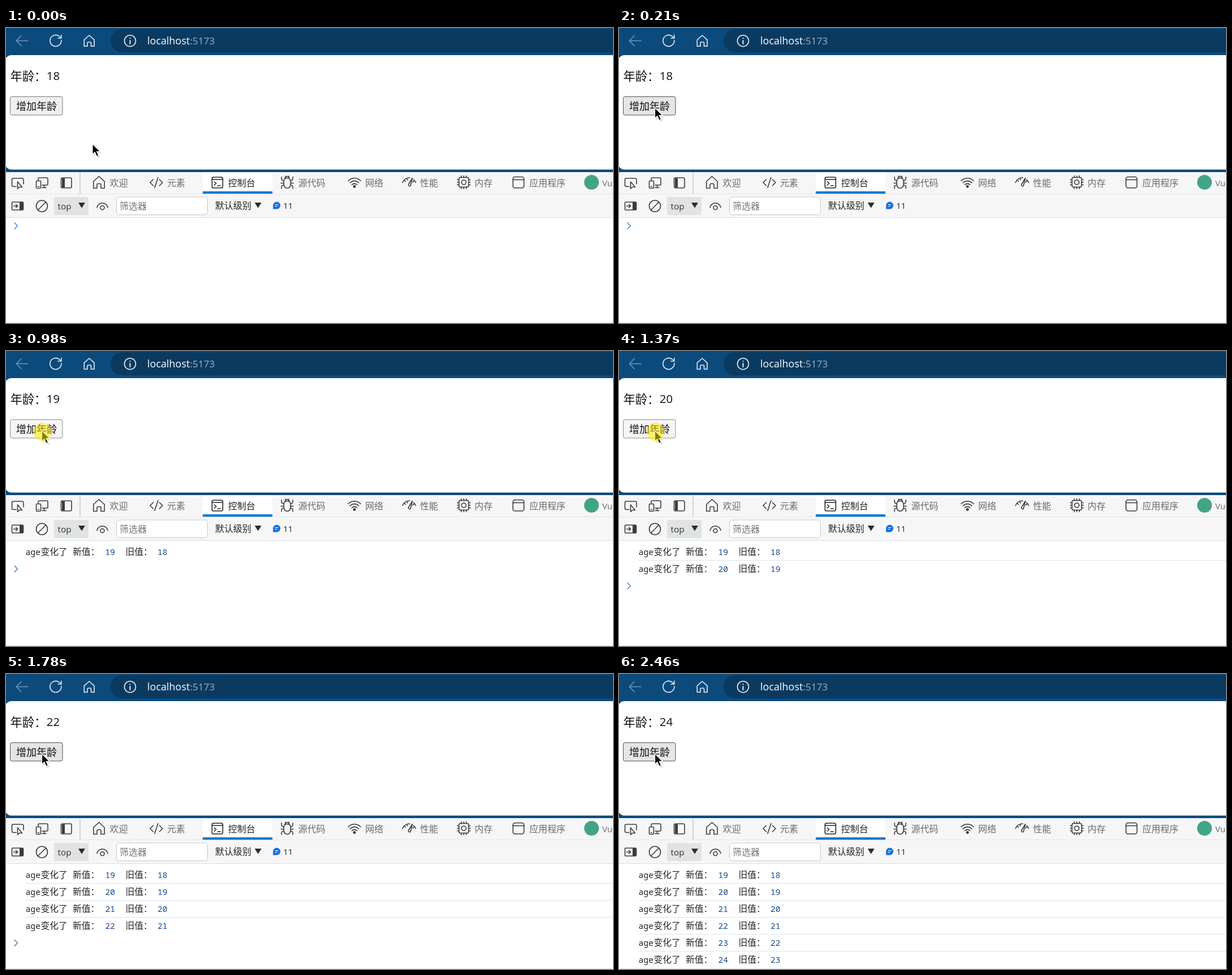
Animation of 1074x522 px, one loop 3020 ms. Source, as an HTML page:

```html
<!DOCTYPE html>
<html lang="zh">
<head>
<meta charset="utf-8">
<title>Age watcher</title>
<style>
  html, body { margin: 0; width: 100%; height: 100%; overflow: hidden; background: #fff; }
  svg { display: block; width: 100%; height: 100%; }
  text { font-family: "Open Sans", "Noto Sans CJK SC", "Noto Sans CJK", sans-serif; white-space: pre; }
  .line { fill: none; stroke-width: 1.6; stroke-linecap: round; stroke-linejoin: round; }
  .light { stroke: #e4eef6; }
  .dark { stroke: #3b3b3b; }
  .fill { fill: #3b3b3b; stroke: none; }
  .tabs { font-size: 16px; fill: #6b6b6b; }
  .log text { font-family: "Noto Sans Mono", "Noto Sans CJK SC", "Noto Sans CJK", monospace; font-size: 14.7px; fill: #222; }
  .log .cjk { font-family: "Noto Sans CJK SC", "Noto Sans CJK", sans-serif; font-size: 15.8px; }
  .log .num { fill: #174a8c; }
  #button { fill: #efefef; stroke: #767676; }
  #button.hover { fill: #e5e5e5; stroke: #4f4f4f; }
  #button.down { fill: #f5f5f5; stroke: #8d8d8d; }
</style>
</head>
<body>
<svg viewBox="0 0 1074 522" preserveAspectRatio="none">
  <rect width="1074" height="522" fill="#fff"/>

  <!-- browser bar -->
  <rect width="1074" height="255" fill="#0c4a7c"/>
  <rect x="185" y="2" width="920" height="41" rx="20.5" fill="#0a3a60"/>
  <g class="line light">
    <path d="M39 22.5H18.5M27 13.5l-8.7 9 8.7 9" stroke="#7299b8"/>
    <path d="M97.8 21.5A10 10 0 1 1 93.5 14.2L97.5 17.5M97.8 12.3V18H92"/>
    <path d="M138.3 20.8L147.2 13l8.9 7.8V32.3H150.5V26.5a1.5 1.5 0 0 0-1.5-1.5H145.5a1.5 1.5 0 0 0-1.5 1.5V32.3H138.3Z"/>
    <circle cx="219.5" cy="22.7" r="10"/>
    <path d="M219.5 22v6M219.5 18v.2" stroke-width="2"/>
  </g>
  <text x="250" y="29" font-size="18" fill="#fff">localhost</text>
  <text x="325.5" y="29" font-size="17.2" fill="#9db1c2">:5173</text>

  <!-- page -->
  <rect x="-1" y="48" width="1100" height="202.5" rx="10" fill="#fff"/>
  <text x="7.5" y="92.5" font-size="21.3" fill="#111">年龄：</text>
  <text id="age" x="71.8" y="92.3" font-size="20.3" fill="#111">18</text>
  <rect id="button" x="7.5" y="121.5" width="92.5" height="32.5" rx="3"/>
  <text x="18" y="144.7" font-size="18" fill="#111">增加年龄</text>

  <!-- developer tools -->
  <rect y="255" width="1074" height="81" fill="#f6f6f6"/>
  <path d="M0 293.5H1074" stroke="#e6e6e6"/>
  <path d="M0 335.5H1074" stroke="#d3e1f2"/>
  <path d="M131 256V293" stroke="#bdbdbd" stroke-width="1.3"/>
  <rect x="348" y="255" width="123" height="36" fill="#fff"/>
  <rect x="348" y="289" width="123.5" height="4.2" rx="1" fill="#0a78d4"/>
  <path d="M0 521.5H1074" stroke="#e4e7ea"/>

  <g class="line dark">
    <path d="M18 280.5H13a2.5 2.5 0 0 1-2.5-2.5V268.5a2.5 2.5 0 0 1 2.5-2.5H28.500a2.500 2.500 0 0 1 2.500 2.500V276"/>
    <path d="M20.500 272V284.500l3-3H28.500Z" fill="#f6f6f6"/>
    <path d="M57 269V267a2 2 0 0 1 2-2H72a2 2 0 0 1 2 2V276a2 2 0 0 1-2 2H64M64 282.500H71M67.500 278v4"/>
    <rect x="53.500" y="270.500" width="8" height="13" rx="1.500"/>
    <path d="M56.500 280.500h2"/>
    <rect x="97.500" y="265" width="18.500" height="18" rx="2.500"/>
    <path class="fill" d="M99 266h5v16h-5z"/>

    <path d="M154.800 271.500L164.500 262.500l9.700 9V283.500H168V277a1.500 1.500 0 0 0-1.500-1.500H162.500a1.500 1.500 0 0 0-1.500 1.500V283.500H154.800Z"/>
    <path d="M260.500 268l-5.500 5.500 5.500 5.500M271.500 268l5.500 5.500-5.500 5.500M269 264.500l-6 18"/>
    <g stroke="#222">
      <rect x="364.500" y="264" width="19" height="19" rx="2.500"/>
      <path d="M364.500 268H383.500M368.500 272l3.500 3-3.500 3M374.500 279h5"/>
    </g>
    <path d="M491.500 270.500a6 5 0 0 1 12 0V277a6 6.500 0 0 1-12 0ZM493.500 266.500a4 4 0 0 1 8 0M494.500 262l1 2M500.500 262l-1 2"/>
    <path d="M487.500 263.500V266.500q0 3 4 4M486.500 274.500h5M487.500 284V281q0-2.500 4-3M507.500 263.500V266.500q0 3-4 4M508.500 274.500h-5M507.500 284V281q0-2.500-4-3"/>
    <path d="M605.500 270.500a15 15 0 0 1 22 0M608.800 274a10.500 10.500 0 0 1 15.400 0M612 277.300a6.200 6.200 0 0 1 9 0"/>
    <circle cx="616.500" cy="280.500" r="1.700" fill="#3b3b3b"/>
    <path d="M701.500 273.500a14 14 0 0 1 13-8.500M721 268a14 14 0 0 1 4 5.500M704 269l3 2.500M709 266l1.500 3M722.500 270.500l-3 2"/>
    <path d="M719 265.500l-7 11.500a2.200 2.200 0 0 0 3.700 2Z"/>
    <rect x="801.500" y="264.500" width="17" height="17" rx="2.500"/>
    <circle cx="810" cy="273" r="4"/>
    <path d="M805.500 261.500v3M810 261.500v3M814.500 261.500v3M805.500 281.500v3M810 281.500v3M814.500 281.500v3M798.500 268.500h3M798.500 273h3M798.500 277.500h3M818.500 268.500h3M818.500 273h3M818.500 277.500h3"/>
    <rect x="897" y="263.500" width="19.500" height="19.500" rx="3.500"/>
    <path d="M897 268.500H916.500"/>
  </g>
  <circle cx="1036" cy="273" r="13" fill="#42a486"/>
  <g class="tabs">
    <text x="183.500" y="279.500">欢迎</text>
    <text x="285" y="279.500">元素</text>
    <text x="393" y="279.500" fill="#222">控制台</text>
    <text x="517" y="279.500">源代码</text>
    <text x="635.500" y="279.500">网络</text>
    <text x="732.500" y="279.500">性能</text>
    <text x="829" y="279.500">内存</text>
    <text x="926" y="279.500">应用程序</text>
    <text x="1055" y="279.500" font-size="15">Vue</text>
  </g>

  <!-- console toolbar -->
  <rect x="85" y="299" width="61" height="32" rx="2" fill="#e1e2e2"/>
  <rect x="195.500" y="299" width="161" height="31.500" rx="5" fill="#fff" stroke="#c9c9c9"/>
  <g class="line dark">
    <rect x="10.500" y="308" width="20" height="14" rx="1.500"/>
    <path class="fill" d="M24 308h7v14h-7z"/>
    <path d="M13.500 315H20.500M17.500 312l3.200 3-3.200 3"/>
    <circle cx="63.500" cy="315" r="10"/>
    <path d="M70.500 308L56.500 322"/>
    <path d="M161 317.500a9.700 9.700 0 0 1 19 0"/>
    <circle cx="170.500" cy="318" r="3.500"/>
  </g>
  <path d="M128 309h12l-6 9.500ZM440 309h12l-6 9.500Z" fill="#2b2b2b"/>
  <text x="91.500" y="320.500" font-size="15.300" fill="#333">top</text>
  <text x="201" y="320.800" font-size="16" fill="#777">筛选器</text>
  <text x="370" y="320" font-size="16" fill="#222">默认级别</text>
  <path d="M472.500 320.500V314a6.500 6.500 0 1 1 6.500 6.500Z" fill="#1a6fe0"/>
  <path d="M476 312.500h6M476 315.500h4" stroke="#fff" stroke-width="1.200"/>
  <text x="490.500" y="320" font-size="14.800" fill="#222">11</text>

  <!-- console output -->
  <g id="log" class="log"></g>
  <path id="prompt" class="line" d="M15 -5.500l5.500 5.500L15 5.500" stroke="#4a8fd6" stroke-width="1.500"/>

  <!-- pointer -->
  <g id="pointer">
    <path d="M2 3V22l4.500-4 3.300 7 4-1.700-3-6.500H16.500Z" fill="#000" opacity=".13"/>
    <path d="M0 0V18.800l4.300-4 3.300 7.400 3.300-1.500-3.200-7.200H13.500Z" fill="#000" stroke="#fff" stroke-width="1.200"/>
  </g>
  <circle id="spot" cx="64.500" cy="143" r="16" fill="#ffec00" opacity=".52"/>
</svg>
<script>
  const LOOP = 3020, FIRST_AGE = 18;
  // pointer down, pointer up with new age, console row printed
  const clicks = [
    [640, 700, 700], [980, 1080, 1080], [1370, 1430, 1470],
    [1680, 1780, 1780], [2030, 2120, 2120], [2360, 2420, 2460]
  ];
  const el = id => document.getElementById(id);
  const age = el('age'), button = el('button'), log = el('log');
  const prompt = el('prompt'), pointer = el('pointer'), spot = el('spot');

  const label = (x, y, str, kind = '') => `<text x="${x}" y="${y}" class="${kind}">${str}</text>`;
  const rule = y => `<path d="M35 ${y}H1074" stroke="#d6e4f3"/>`;

  log.innerHTML = clicks.map((_, i) => {
    const y = 360.7 + 30 * i, old = FIRST_AGE + i;
    return '<g>' + (i ? rule(340.5 + 30 * i) : '') +
      label(34.5, y, 'age') + label(61.5, y, '变化了', 'cjk') +
      label(118, y, '新值：', 'cjk') + label(175.5, y, old + 1, 'num') +
      label(211.5, y, '旧值：', 'cjk') + label(268, y, old, 'num') + '</g>';
  }).join('');
  const rows = [...log.children];

  function draw(t) {
    // the pointer advances in seven steps, 30 ms apart
    const k = Math.min(7, Math.floor(t / 30)) / 7;
    const ease = k * k * (3 - 2 * k);
    const x = 153 - 89.5 * ease, y = 205 - 64 * ease;
    pointer.setAttribute('transform', `translate(${x} ${y})`);

    const down = clicks.some(([press, release]) => t >= press && t < release);
    const over = x < 100 && y < 154;
    button.setAttribute('class', down ? 'down' : over ? 'hover' : '');
    spot.style.display = down ? '' : 'none';

    const text = String(FIRST_AGE + clicks.filter(c => t >= c[1]).length);
    if (age.textContent !== text) age.textContent = text;

    const count = clicks.filter(c => t >= c[2]).length;
    rows.forEach((row, i) => row.style.display = i < count ? '' : 'none');
    prompt.setAttribute('transform', `translate(0 ${count ? 355.5 + 30.1 * count : 350})`);
  }

  const start = performance.now();
  function tick() {
    draw((performance.now() - start) % LOOP);
    requestAnimationFrame(tick);
  }
  tick();
</script>
</body>
</html>
```
